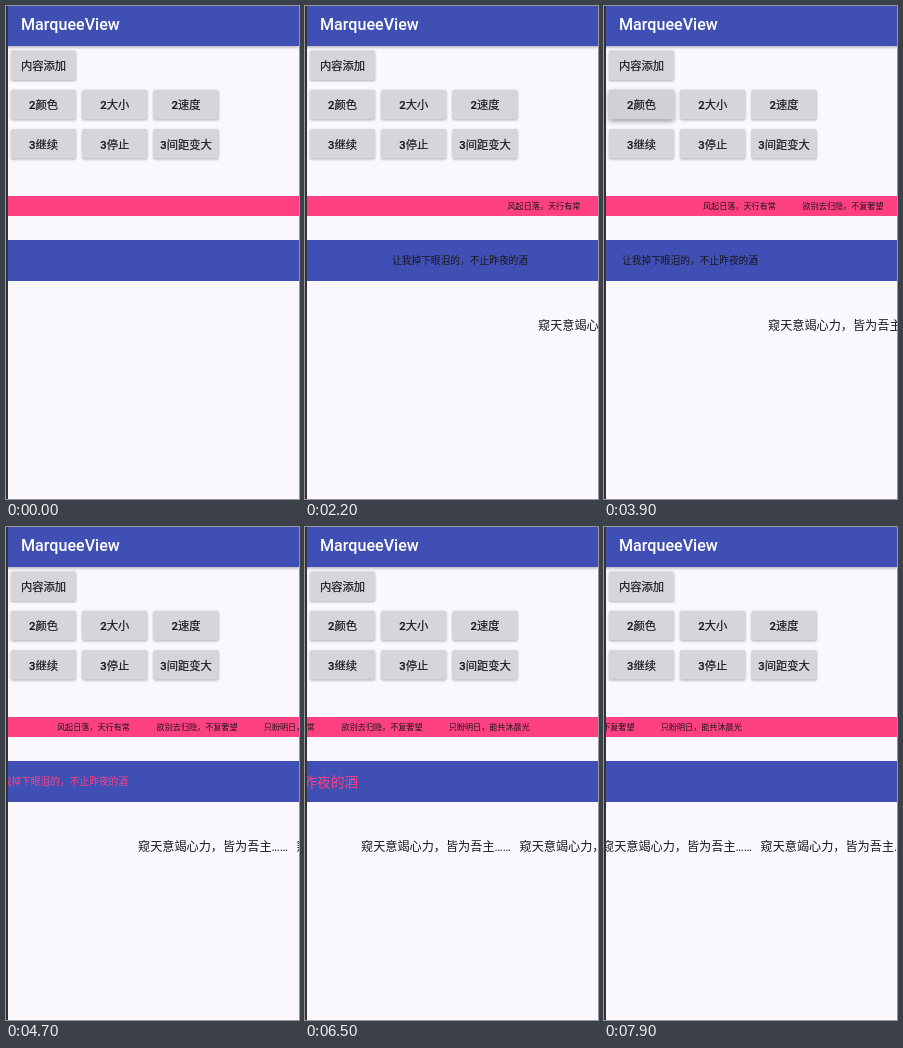
An HTML page with a canvas for the animation above (8000 ms loop, 293 px wide and 493 px high).

```html
<!DOCTYPE html>
<html lang="zh-CN">
<head>
<meta charset="utf-8">
<title>MarqueeView</title>
<style>
html, body { margin: 0; width: 100%; height: 100%; overflow: hidden; background: #faf8fc; }
canvas { display: block; width: 293px; height: 493px; }
</style>
</head>
<body>
<canvas id="stage"></canvas>
<script>
const W = 293, H = 493, LOOP = 8000, STEP = 100;
const FONT = 'Roboto, "Noto Sans CJK SC", "Noto Sans CJK JP", "Noto Sans CJK", sans-serif';
const INDIGO = '#404fb3', PINK = '#ff4081', INK = '#17171b';

const canvas = document.getElementById('stage');
const ctx = canvas.getContext('2d');
const ratio = window.devicePixelRatio || 1;
canvas.width = W * ratio;
canvas.height = H * ratio;

// label, column, row, press start and end
const buttons = [
  ['内容添加', 0, 0, 700, 1000],
  ['2颜色', 0, 1, 3800, 4100],
  ['2大小', 1, 1, 4800, 5100],
  ['2速度', 2, 1, 5600, 5900],
  ['3继续', 0, 2],
  ['3停止', 1, 2],
  ['3间距变大', 2, 2]
];

const COLOR_AT = 4000, SIZE_AT = 5000, FAST_AT = 5700;

// Scroll distance over time, with the slight unevenness of the ticker.
const pace = [[700, 0], [1400, 28], [3000, 94], [4700, 162], [5700, 204], [6500, 238], [7900, 296]];

function travel(t) {
  let i = 1;
  while (i < pace.length - 1 && t > pace[i][0]) i++;
  const [t0, d0] = pace[i - 1], [t1, d1] = pace[i];
  return d0 + (d1 - d0) * (t - t0) / (t1 - t0);
}

function rect(x, y, w, h, color) {
  ctx.fillStyle = color;
  ctx.fillRect(x, y, w, h);
}

function text(str, x, y, size, color, weight = 400) {
  ctx.font = `${weight} ${size}px ${FONT}`;
  ctx.fillStyle = color;
  ctx.fillText(str, x, y);
}

function shadow(blur, dy, alpha) {
  ctx.shadowColor = `rgba(0,0,0,${alpha})`;
  ctx.shadowBlur = blur * ratio;
  ctx.shadowOffsetY = dy * ratio;
}

function drawButton([label, col, row, from, to], t) {
  const x = 5 + col * 71.3, y = 44.5 + row * 39.2, w = 65, h = 29.5;
  const pressed = t >= from && t < to;
  ctx.save();
  if (pressed) shadow(5, 2, 0.4);
  else shadow(2.5, 1, 0.3);
  ctx.fillStyle = pressed ? '#d3d0d5' : '#d8d5da';
  ctx.beginPath();
  ctx.roundRect(x, y, w, h, 1.6);
  ctx.fill();
  ctx.restore();

  ctx.textAlign = 'center';
  text(label, x + w / 2, y + 19.7, 11.3, INK, 500);
  ctx.strokeStyle = INK;
  ctx.lineWidth = 0.2;
  ctx.strokeText(label, x + w / 2, y + 19.7);
  ctx.textAlign = 'left';
}

function drawMarquees(t) {
  if (t < 700) return;
  const d = travel(t);

  const x1 = 294 - 1.5 * d;
  text('风起日落，天行有常', x1, 203, 8.1, INK);
  text('欲别去归隐，不复奢望', x1 + 99.6, 203, 8.1, INK);
  text('只盼明日，能共沐晨光', x1 + 206.8, 203, 8.1, INK);

  const boost = t > FAST_AT ? 1.45 * (d - travel(FAST_AT)) : 0;
  const large = t >= SIZE_AT;
  text('让我掉下眼泪的，不止昨夜的酒', 148 - d - boost, large ? 260 : 258,
    large ? 13.75 : 9.72, t >= COLOR_AT ? PINK : INK);

  for (let x = 294 - d; x < W; x += 158.5) {
    text('窥天意竭心力，皆为吾主……', x, 324, 12.15, INK);
  }
}

function draw(t) {
  ctx.setTransform(ratio, 0, 0, ratio, 0, 0);
  rect(0, 0, W, H, '#faf8fc');

  ctx.save();
  shadow(3, 1, 0.35);
  rect(0, 0, W, 40, INDIGO);
  ctx.restore();
  text('MarqueeView', 15, 24, 16.1, '#fff', 500);

  buttons.forEach(b => drawButton(b, t));
  rect(0, 190, W, 20, PINK);
  rect(0, 234, W, 41, INDIGO);
  drawMarquees(t);
  rect(0, 0, 2, H, '#333238');
}

const start = performance.now();
function frame() {
  const t = (performance.now() - start) % LOOP;
  draw(Math.floor(t / STEP) * STEP);
  requestAnimationFrame(frame);
}
frame();
</script>
</body>
</html>
```
